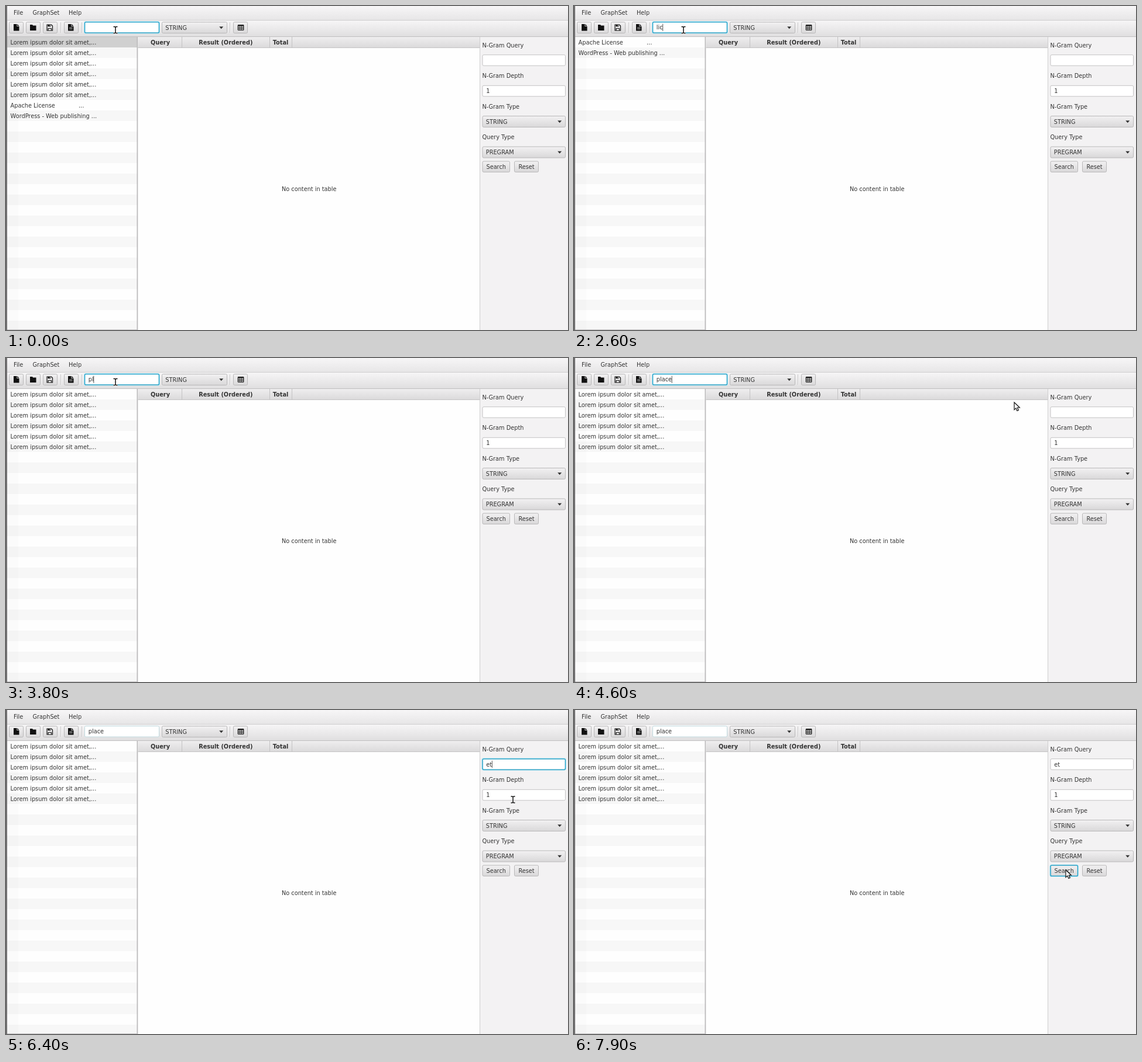
An HTML page for the animation above (8 s loop, 960 px wide and 555 px high).

```html
<!DOCTYPE html>
<html lang="en">
<head>
<meta charset="utf-8">
<title>N-Gram search</title>
<style>
html, body { margin: 0; width: 100%; height: 100%; overflow: hidden; background: #f3f2f3; }
svg { display: block; width: 960px; height: 555px; }
text { font: 9.75px "DejaVu Sans", sans-serif; fill: #333; white-space: pre; }
.bold { font-weight: bold; }
.mid { text-anchor: middle; }
</style>
</head>
<body>
<svg id="stage" viewBox="0 0 960 555">
  <defs>
    <linearGradient id="bar" x2="0" y2="1"><stop stop-color="#f7f6f7"/><stop offset="1" stop-color="#e6e5e6"/></linearGradient>
    <linearGradient id="tools" x2="0" y2="1"><stop stop-color="#f6f5f6"/><stop offset="1" stop-color="#dfdedf"/></linearGradient>
    <linearGradient id="head" x2="0" y2="1"><stop stop-color="#efeeef"/><stop offset="1" stop-color="#dad9da"/></linearGradient>
    <linearGradient id="btn" x2="0" y2="1"><stop stop-color="#f2f1f2"/><stop offset="1" stop-color="#d9d8d9"/></linearGradient>
  </defs>
</svg>
<script>
const stage = document.getElementById('stage');
const LOOP = 8000;

function add(tag, attrs, parent = stage) {
  const el = document.createElementNS('http://www.w3.org/2000/svg', tag);
  for (const k in attrs) el.setAttribute(k, attrs[k]);
  return parent.appendChild(el);
}
const set = (el, attrs) => { for (const k in attrs) el.setAttribute(k, attrs[k]); };
const show = (el, on) => el.setAttribute('visibility', on ? 'visible' : 'hidden');
const rect = (x, y, width, height, fill, more = {}) => add('rect', { x, y, width, height, fill, ...more });
const path = (d, fill, more = {}, parent = stage) => add('path', { d, fill, ...more }, parent);
function label(str, x, y, cls = '') {
  const el = add('text', { x, y, class: cls });
  el.textContent = str;
  return el;
}
const box = (x, y, w, h, fill, stroke) => rect(x + .5, y + .5, w - 1, h - 1, fill, { stroke, rx: 2 });
const button = (x, y, w, h) => box(x, y, w, h, 'url(#btn)', '#b9b8b9');

function ring(x, y, w, h) {
  const g = add('g', { fill: 'none' });
  add('rect', { x: x - .4, y: y - .4, width: w + .8, height: h + .8, rx: 3, stroke: '#b4e3f0', 'stroke-width': 1.4 }, g);
  add('rect', { x: x + .6, y: y + .6, width: w - 1.2, height: h - 1.2, rx: 2, stroke: '#1b9fc8', 'stroke-width': 1.3 }, g);
  return g;
}
function field(x, y, w, h) {
  const frame = box(x, y, w, h, '#fff', '#c3c2c3');
  const text = label('', x + 6.8, y + 13.3);
  const caret = rect(x + 6.5, y + 3.5, .9, 12.5, '#444');
  return { x, frame, text, caret, ring: ring(x, y, w, h) };
}
function combo(str, x, y, w) {
  button(x, y, w, 20);
  label(str, x + 6.3, y + 13.5);
  path(`M${x + w - 13.8} ${y + 8.2}h7l-3.5 4z`, '#333');
}

// Menu and toolbar
rect(0, 0, 960, 25, 'url(#bar)');
rect(0, 24, 960, 1, '#cfcecf');
[['File', 13], ['GraphSet', 45.5], ['Help', 107]].forEach(([s, x]) => label(s, x, 15));
rect(0, 25, 960, 28, 'url(#tools)');
rect(0, 52, 960, 1, '#c0bfc0');
[5, 34, 63, 99, 388].forEach(x => button(x, 27, 25, 20));
[93, 129, 382].forEach(x => {
  rect(x, 28, 1, 18, '#cac9ca');
  rect(x + 1, 28, 1, 18, '#f4f3f4');
});
const sheet = x => {
  path(`M${x} 31h5.5v4h4v7.5h-9.5z`, '#111');
  path(`M${x + 6.3} 31l3.2 3.2h-3.2z`, '#111');
};
sheet(13);
path('M41 32h4l1.2 1.5h5.3v8.5h-10.5z', '#111');
path('M70 32h7.5l2 2v8h-9.5z', 'none', { stroke: '#111', 'stroke-width': 1.2 });
path('M71.5 32h5v3.2h-5zM71.5 38h6.5v4h-6.5z', '#111');
path('M74.6 32.6h1.2v2h-1.2zM72.7 39h4.2v2.4h-4.2z', '#eee');
sheet(106);
path('M108 37h5.5M108 39.2h5.5', 'none', { stroke: '#ddd', 'stroke-width': .8 });
rect(395.8, 32, 10.6, 9.8, '#111', { rx: 1 });
for (let i = 0; i < 9; i++)
  rect(397 + i % 3 * 3, 34.2 + Math.floor(i / 3) * 2.4, 2.2, 1.5, '#eee');

const search = field(134, 27, 128, 19.5);
combo('STRING', 266, 27, 112);

// Document list
rect(2, 53, 222, 502, '#fff');
for (let i = 0; i < 28; i++) rect(2, 53 + i * 18, 222, 18, i % 2 ? '#f7f7f7' : '#fefefe');
const selected = rect(2, 53, 222, 18, '#d0d0d0');
rect(2, 53, 19, 502, '#000', { opacity: .012 });
rect(2, 554, 222, 1, '#c4c3c4');
const rows = Array.from({ length: 8 }, (_, i) => {
  const name = label('', 7.6, 66 + i * 18);
  const dots = label('...', 124, 66 + i * 18);
  return { name, dots };
});
const lorem = Array(6).fill('Lorem ipsum dolor sit amet,...');
const licences = ['Apache License', 'WordPress - Web publishing ...'];
const lists = { all: [...lorem, ...licences], lorem, licences };

// Result table
rect(223.5, 53, 2, 502, '#bbbabb');
rect(225.5, 53, 584, 502, '#fefefe');
rect(225.5, 53, 584, 19, 'url(#head)');
rect(225.5, 71, 584, 1, '#c5c4c5');
[300, 450, 488].forEach(x => rect(x, 53, 1, 19, '#c3c2c3'));
[['Query', 263.5], ['Result (Ordered)', 375.3], ['Total', 469]].forEach(([s, x]) => label(s, x, 66, 'bold mid'));
label('No content in table', 517.7, 317.3, 'mid');

// Query panel
rect(809, 53, 151, 502, '#f3f2f3');
rect(809, 53, 1, 502, '#cfcecf');
['N-Gram Query', 'N-Gram Depth', 'N-Gram Type', 'Query Type'].forEach((s, i) => label(s, 813.4, 70.7 + i * 52.5));
const query = field(813.5, 83.2, 142.5, 19.5);
const depth = field(813.5, 135.8, 142.5, 19.5);
depth.text.textContent = '1';
show(depth.ring, false);
show(depth.caret, false);
combo('STRING', 813.5, 188, 142.5);
combo('PREGRAM', 813.5, 240.5, 142.5);
button(813.5, 265.5, 47.5, 19.5);
label('Search', 837.2, 279, 'mid');
button(868, 265.5, 42, 19.5);
label('Reset', 889, 279, 'mid');
const searchRing = ring(813.5, 265.5, 47.5, 19.5);

rect(0, 0, 2, 555, '#737273');

// Mouse pointers
const beam = add('g', { fill: 'none' });
const beamPath = 'M-3.5-5.5h2.3l1.2 1 1.2-1h2.3M-3.5 5.5h2.3l1.2-1 1.2 1h2.3M0-4.5v9';
path(beamPath, 'none', { stroke: '#fff', 'stroke-width': 3 }, beam);
path(beamPath, 'none', { stroke: '#111', 'stroke-width': 1.5 }, beam);
const arrow = add('g', {});
path('M0 0v12.6l2.9-2.7 2 4.6 2.4-1-2-4.5h4z', '#fff', { stroke: '#111', 'stroke-width': 1.2 }, arrow);

// time, search text, query text, focus, list
const steps = [
  [0, '', '', 'search', 'all'],
  [600, '', '', 'search', 'all'],
  [1100, 'l', '', 'search', 'all'],
  [1300, 'li', '', 'search', 'licences'],
  [2200, 'lic', '', 'search', 'licences'],
  [2900, 'li', '', 'search', 'licences'],
  [3000, 'l', '', 'search', 'all'],
  [3100, '', '', 'search', 'all'],
  [3500, 'p', '', 'search', 'all'],
  [3800, 'pl', '', 'search', 'lorem'],
  [4000, 'pla', '', 'search', 'lorem'],
  [4200, 'plac', '', 'search', 'lorem'],
  [4400, 'place', '', 'search', 'lorem'],
  [5000, 'place', '', 'query', 'lorem'],
  [5500, 'place', '', 'query', 'lorem'],
  [5800, 'place', 'e', 'query', 'lorem'],
  [6000, 'place', 'et', 'query', 'lorem'],
  [7500, 'place', 'et', 'button', 'lorem']
];
const moves = [
  [0, 187, 41], [4300, 187, 41], [4600, 752, 76], [5000, 843, 99], [5200, 841, 97.5],
  [6100, 841, 97.5], [6400, 866, 153.5], [6700, 868, 192], [7000, 850, 248], [7300, 840, 274], [LOOP, 840, 274]
];

function pointerAt(t) {
  const i = moves.findIndex(m => m[0] > t);
  const [t0, x0, y0] = moves[i - 1], [t1, x1, y1] = moves[i];
  const p = (t - t0) / (t1 - t0), k = p * p * (3 - 2 * p);
  return [x0 + (x1 - x0) * k, y0 + (y1 - y0) * k];
}
const within = (x, y, l, t, r, b) => x > l && x < r && y > t && y < b;

function drawField(f, str, focused, blink) {
  if (f.text.textContent !== str) f.text.textContent = str;
  show(f.ring, focused);
  show(f.caret, focused && blink);
  const w = str ? f.text.getComputedTextLength() : 0;
  f.caret.setAttribute('x', f.x + 6.5 + w);
}

function draw(t) {
  const [since, text, gram, focus, list] = steps.filter(s => s[0] <= t).pop();
  const blink = t >= 600 && (t - since) % 1000 < 500;
  drawField(search, text, focus === 'search', blink);
  drawField(query, gram, focus === 'query', blink);
  search.frame.setAttribute('stroke', t < 5000 ? '#c3c2c3' : '#bfd9de');
  show(searchRing, focus === 'button');

  show(selected, t < 1300);
  rows.forEach(({ name, dots }, i) => {
    const str = lists[list][i] || '';
    if (name.textContent !== str) name.textContent = str;
    show(dots, str === licences[0]);
  });

  const [x, y] = pointerAt(t);
  const typing = within(x, y, 134, 27, 262, 47) || within(x, y, 814, 83, 956, 103) || within(x, y, 814, 136, 956, 156);
  show(beam, typing);
  show(arrow, !typing);
  const transform = `translate(${x} ${y})`;
  set(beam, { transform });
  set(arrow, { transform });
}

const start = performance.now();
function tick() {
  draw((performance.now() - start) % LOOP);
  requestAnimationFrame(tick);
}
draw(0);
requestAnimationFrame(tick);
</script>
</body>
</html>
```
